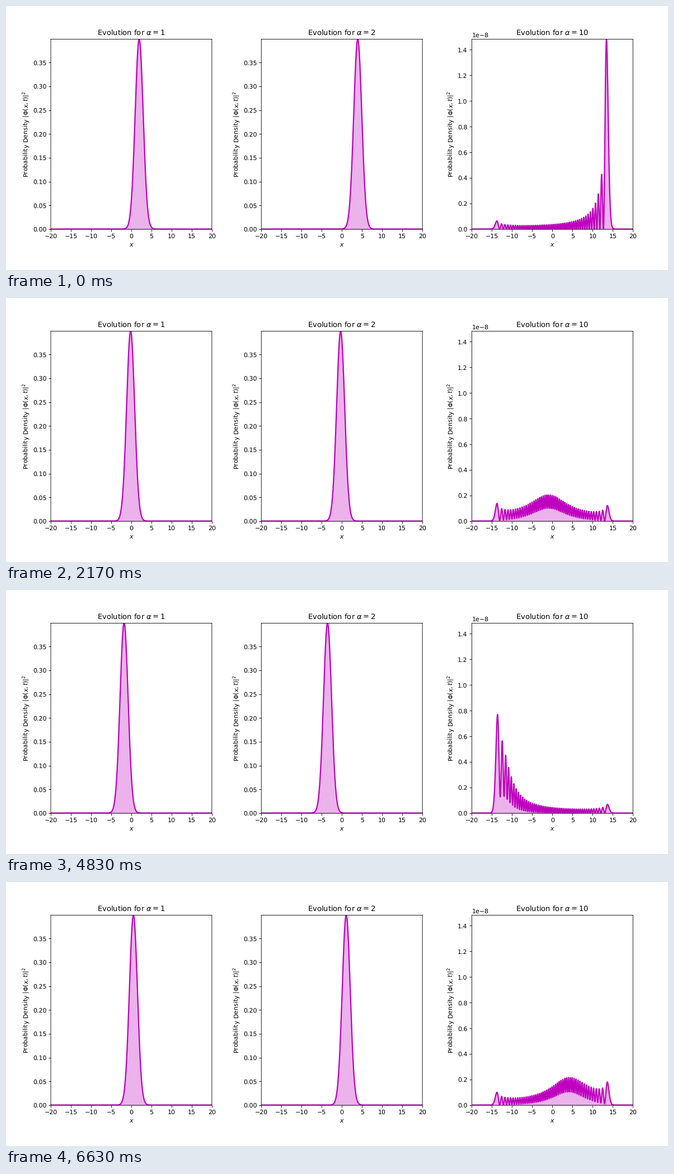
These frames come from a looping animation (1183x473 px, 6.66 s). A matplotlib script:

```python
import numpy as np
import matplotlib.pyplot as plt
from matplotlib.animation import FuncAnimation
from matplotlib.transforms import Affine2D

WIDTH, HEIGHT, DPI = 1183, 473, 78.87
FRAMES, LOOP_MS = 200, 6660
LEVELS = 51  # the expansion is cut off here, which distorts large alpha
ALPHAS = (1, 2, 10)
COLOR = "m"

# Panel geometry in pixels, measured from the top left corner.
LEFT, PITCH, PANEL_WIDTH = 80.05, 376.2, 287.85
TOP, BOTTOM = 59.5, 400.05
CURVE_SHIFT = Affine2D().translate(-0.4, 0.4)

# Smooth, unsnapped edges and glyphs.
plt.rcParams.update({"path.snap": False, "text.hinting": "no_hinting"})

x = np.linspace(-20, 20, 1000)
times = np.linspace(0, 5, FRAMES)
levels = np.arange(LEVELS)


def oscillator_states():
    """Harmonic oscillator eigenfunctions, scaled so the ground state has unit variance."""
    states = [(2 * np.pi) ** -0.25 * np.exp(-x**2 / 4)]
    states.append(x * states[0])
    for n in range(1, LEVELS - 1):
        states.append((x * states[n] - np.sqrt(n) * states[n - 1]) / np.sqrt(n + 1))
    return np.array(states)


def coherent_coefficients(alpha):
    ratios = alpha / np.sqrt(np.maximum(levels, 1))
    ratios[0] = np.exp(-alpha**2 / 2)
    return np.cumprod(ratios)


STATES = oscillator_states()


def density(coefficients, t):
    return np.abs((coefficients * np.exp(-1j * levels * t)) @ STATES) ** 2


class Panel:
    def __init__(self, fig, left, alpha):
        self.ax = fig.add_axes((left / WIDTH, 1 - BOTTOM / HEIGHT,
                                PANEL_WIDTH / WIDTH, (BOTTOM - TOP) / HEIGHT))
        self.coefficients = coherent_coefficients(alpha)
        start = density(self.coefficients, 0)
        self.ax.set_xlim(-20, 20)
        self.ax.set_ylim(0, start.max())
        self.ax.set_title(rf"Evolution for $\alpha = {alpha}$")
        self.ax.set_xlabel("$x$")
        self.ax.set_ylabel(r"Probability Density $|\Phi(x,t)|^2$")
        self.transform = self.ax.transData + CURVE_SHIFT
        self.line, = self.ax.plot(x, start, color=COLOR, lw=2, transform=self.transform)
        self.fill = None

    def update(self, t):
        y = density(self.coefficients, t)
        self.line.set_ydata(y)
        if self.fill is not None:
            self.fill.remove()
        self.fill = self.ax.fill_between(x, y, color=COLOR, alpha=0.3,
                                         transform=self.transform)


# The small margin keeps the pixel size from being truncated downwards.
fig = plt.figure(figsize=((WIDTH + 0.001) / DPI, (HEIGHT + 0.001) / DPI), dpi=DPI)
panels = [Panel(fig, LEFT + PITCH * i, alpha) for i, alpha in enumerate(ALPHAS)]


def update(frame):
    for panel in panels:
        panel.update(times[frame])
    return [artist for p in panels for artist in (p.line, p.fill)]


animation = FuncAnimation(fig, update, frames=FRAMES, interval=LOOP_MS / FRAMES,
                          init_func=lambda: update(0), repeat=True, repeat_delay=0)
plt.show()
```
